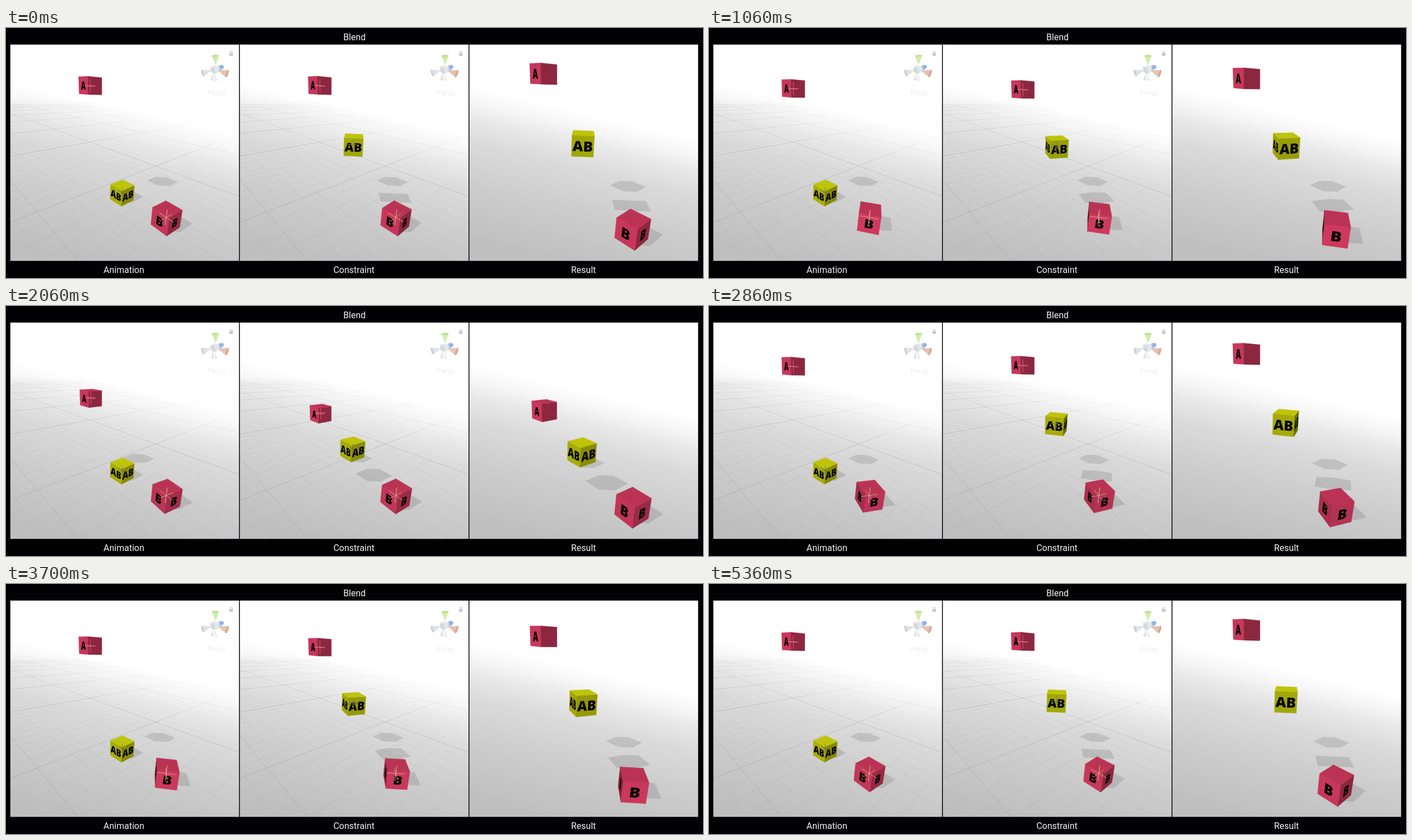
An HTML page with a canvas for the animation above (5400 ms loop, 1248 px wide and 449 px high).

```html
<!DOCTYPE html>
<html lang="en">
<head>
<meta charset="utf-8">
<title>Blend</title>
<style>
html, body { margin: 0; width: 100%; height: 100%; overflow: hidden; background: #020205; }
canvas { display: block; }
</style>
</head>
<body>
<canvas id="stage" width="1248" height="449"></canvas>
<script>
const stage = document.getElementById('stage');
const backdrop = document.createElement('canvas');
backdrop.width = stage.width;
backdrop.height = stage.height;
let g = backdrop.getContext('2d');

const TOP = 29.5, W = 410, H = 389, MID_Y = 224.5;
const FRAME = 100 / 3, FRAMES = 162;
const BOUNCE = 161 * FRAME / 4;      // one fall and rise of cube A, ms
const RAD = Math.PI / 180;
const SP = Math.sin(18 * RAD), CP = Math.cos(18 * RAD);     // camera pitch
const SR = Math.sin(2.4 * RAD), CR = Math.cos(2.4 * RAD);   // camera roll
const SIZE = 0.9, GROUND = -5.4;
const LIGHT = 0.81;                  // shadow shift to the right per unit of height

// focal: zoom of the view, lead: how far its clock runs ahead in ms
const panels = [
  { x: 7.5, focal: 336, lead: 40, editor: true, blended: false },
  { x: 418.5, focal: 336, lead: 0, editor: true, blended: true },
  { x: 829.5, focal: 394, lead: 0, editor: false, blended: true }
];

// Tint and how its brightness follows the face normal: base, x, y, z
const PINK = { rgb: [207, 57, 94], light: [0.47, -0.2, 0.43, -0.5] };
const YELLOW = { rgb: [190, 196, 10], light: [0.65, -0.13, 0.35, -0.2] };

// Time in ms and distance cube A has fallen
const fall = [[0, 0], [180, .09], [300, .29], [390, .64], [510, 1.98], [550, 2.31], [650, 3.28],
  [720, 2.89], [760, 1.95], [920, .62], [1020, .28], [1060, .21], [1200, .06], [BOUNCE, 0]];

function drop(t) {
  t %= BOUNCE;
  const i = fall.findIndex(k => k[0] > t) - 1;
  const slope = j => {
    const a = fall[j - 1], b = fall[j + 1];
    return a && b ? (b[1] - a[1]) / (b[0] - a[0]) : 0;
  };
  const [t0, y0] = fall[i], [t1, y1] = fall[i + 1];
  const d = t1 - t0, u = (t - t0) / d, u2 = u * u, u3 = u2 * u;
  return y0 * (2 * u3 - 3 * u2 + 1) + y1 * (3 * u2 - 2 * u3)
    + d * (slope(i) * (u3 - 2 * u2 + u) + slope(i + 1) * (u3 - u2));
}

const add = (p, q, k) => [p[0] + q[0] * k, p[1] + q[1] * k, p[2] + q[2] * k];
const dot = (p, q) => p[0] * q[0] + p[1] * q[1] + p[2] * q[2];

// Camera at the origin, pitched down and slightly rolled
function project(view, [x, y, z]) {
  const k = view.focal / (z * CP - y * SP);
  const sx = x * k, sy = -(y * CP + z * SP) * k;
  return [view.x + W / 2 + sx * CR - sy * SR, MID_Y + sx * SR + sy * CR];
}

function turn([x, y, z], yaw) {
  const c = Math.cos(yaw), s = Math.sin(yaw);
  return [x * c - z * s, y, x * s + z * c];
}

function poly(points, color) {
  g.beginPath();
  points.forEach(p => g.lineTo(p[0], p[1]));
  g.closePath();
  g.fillStyle = color;
  g.fill();
}

function hull(points) {
  points.sort((a, b) => a[0] - b[0] || a[1] - b[1]);
  const half = list => {
    const out = [];
    for (const p of list) {
      while (out.length > 1) {
        const [a, b] = out.slice(-2);
        if ((b[0] - a[0]) * (p[1] - a[1]) - (b[1] - a[1]) * (p[0] - a[0]) > 0) break;
        out.pop();
      }
      out.push(p);
    }
    return out.slice(0, -1);
  };
  return half(points).concat(half(points.slice().reverse()));
}

function drawShadow(view, cube) {
  const points = [];
  for (let i = 0; i < 8; i++) {
    const corner = [i & 1, i >> 1 & 1, i >> 2].map(v => (v - 0.5) * SIZE);
    const p = add(cube.pos, turn(corner, cube.yaw), 1);
    points.push(project(view, [p[0] + LIGHT * Math.max(0, p[1] - GROUND), GROUND, p[2]]));
  }
  poly(hull(points), 'rgba(0,0,0,.115)');
}

// Normal, right and up of each face; the first four carry letters
const faces = [0, 1, 2, 3].map(i => {
  const c = Math.round(Math.cos(i * Math.PI / 2)), s = Math.round(Math.sin(i * Math.PI / 2));
  return [[s, 0, -c], [c, 0, s], [0, 1, 0]];
}).concat([[[0, 1, 0], [1, 0, 0], [0, 0, 1]], [[0, -1, 0], [1, 0, 0], [0, 0, -1]]]);

function drawCube(view, cube) {
  const h = SIZE / 2;
  faces.forEach((face, i) => {
    const [n, u, v] = face.map(a => turn(a, cube.yaw));
    const center = add(cube.pos, n, h);
    if (dot(n, center) >= 0) return;
    const at = (a, b) => project(view, add(add(center, u, a * h), v, b * h));
    const light = cube.tint.light;
    const shade = Math.min(1.03, Math.max(0.5, light[0] + dot(n, light.slice(1))));
    const color = `rgb(${cube.tint.rgb.map(c => Math.round(c * shade))})`;
    poly([at(-1, -1), at(1, -1), at(1, 1), at(-1, 1)], color);
    g.strokeStyle = color;
    g.lineWidth = 0.5;
    g.stroke();
    if (i >= cube.letters) return;
    const o = at(0, 0), l = at(-1, 0), r = at(1, 0), t = at(0, 1), b = at(0, -1);
    g.save();
    g.transform((r[0] - l[0]) / 100, (r[1] - l[1]) / 100, (b[0] - t[0]) / 100, (b[1] - t[1]) / 100, o[0], o[1]);
    g.font = '800 66px "Open Sans", "Noto Sans", sans-serif';
    g.textAlign = 'center';
    g.textBaseline = 'alphabetic';
    g.fillStyle = '#080604';
    g.fillText(cube.text, 0, 24);
    g.restore();
  });
  if (view.editor) drawAxes(view, cube);
}

function drawAxes(view, cube) {
  g.lineWidth = 0.9;
  [[1, 0, 0], [0, 1, 0], [0, 0, 1]].forEach((axis, i) => {
    const a = turn(axis, cube.yaw);
    g.strokeStyle = cube.axes[i];
    g.beginPath();
    g.moveTo(...project(view, add(cube.pos, a, -cube.reach)));
    g.lineTo(...project(view, add(cube.pos, a, cube.reach)));
    g.stroke();
  });
}

function drawPanel(view, time) {
  const t = time + view.lead;
  const spin = t / BOUNCE * Math.PI;
  const fallen = drop(t);

  const a = {
    pos: [-2.06, 0.26 - fallen, 11.03], yaw: -45 * RAD,
    tint: PINK, text: 'A', letters: 1, axes: ['#e88391', '#dd5f78', '#e88391'], reach: 0.36
  };
  const b = {
    pos: [1.95, -5.19, 7.01], yaw: 45 * RAD - spin,
    tint: PINK, text: 'B', letters: 4, axes: ['#dfa184', '#d4cf88', '#d8b288'], reach: 0.4
  };
  const ab = {
    pos: [-0.05, view.blended ? -2.5 - fallen / 2 : -5.19, 9.02],
    yaw: view.blended ? -spin / 2 : 45 * RAD,
    tint: YELLOW, text: 'AB', letters: 4, axes: ['#8d8a30', '#777a68', '#55597a'], reach: 0.27
  };

  g.save();
  g.beginPath();
  g.rect(view.x, TOP, W, H);
  g.clip();
  const cubes = [a, ab, b];
  cubes.forEach(c => drawShadow(view, c));
  cubes.forEach(c => drawCube(view, c));
  g.restore();
}

function drawGrid(view) {
  const cx = view.x + W / 2;
  const fade = (from, to, alpha) => {
    const s = g.createLinearGradient(cx, from, cx - (to - from) * 0.2, to);
    s.addColorStop(0, 'rgba(90,90,90,0)');
    s.addColorStop(1, `rgba(90,90,90,${alpha})`);
    return s;
  };
  const minor = fade(145, 310, 0.1), major = fade(140, 220, 0.25);
  g.lineWidth = 0.8;
  for (const [side, start] of [[1, 16.1], [-1, 23.9]]) {
    for (let i = -25; i <= 60; i++) {
      const c = start + i * 1.27;
      g.strokeStyle = i % 10 ? minor : major;
      g.beginPath();
      for (const z of [1, 90]) g.lineTo(...project(view, [side * (c - z), GROUND, z]));
      g.stroke();
    }
  }
}

function ellipse(x, y, rx, ry, angle, color) {
  g.beginPath();
  g.ellipse(x, y, rx, ry, angle, 0, 7);
  g.fillStyle = color;
  g.fill();
}

// Cone from its tip to the middle of its round end
function cone(tx, ty, ex, ey, r, color, end) {
  const angle = Math.atan2(ey - ty, ex - tx);
  const dx = -Math.sin(angle) * r, dy = Math.cos(angle) * r;
  poly([[tx, ty], [ex + dx, ey + dy], [ex - dx, ey - dy]], color);
  ellipse(ex, ey, r * 0.3, r, angle, end);
}

function drawGizmo(x) {
  g.save();
  g.translate(x - 7.5, 0);
  cone(372, 80, 369, 93, 2.8, '#e3e6e8', '#d6dadd');
  cone(374, 80, 376, 94, 2.5, '#eceeef', '#e2e5e7');
  cone(368, 76, 352, 81, 6.5, '#e0e3e5', '#cdd1d4');
  cone(379, 76, 396, 82, 7, '#e5c2b3', '#d5a998');
  ellipse(384, 71, 6, 4.5, -0.4, '#b2c8ea');
  ellipse(386, 70, 4, 3.3, -0.4, '#95b3e0');
  poly([[366, 70], [373, 67], [382, 70], [381, 79], [374, 83], [367, 79]], '#e3e7ea');
  poly([[366, 70], [374, 73], [374, 83], [367, 79]], '#d3d9dc');
  cone(375.5, 67, 375, 50, 6.5, '#d3ecb0', '#c0e48c');
  g.fillStyle = '#c8c8c8';
  g.fillRect(400, 45, 6.5, 5);
  g.strokeStyle = '#c8c8c8';
  g.lineWidth = 1.2;
  g.beginPath();
  g.arc(403.2, 44.5, 2.2, Math.PI, 0);
  g.stroke();
  label('Persp', 376.5, 116.5, '#eeeeee', 12.5);
  g.restore();
}

function label(text, x, y, color = '#f2f2f2', size = 16) {
  g.font = `${size}px Roboto, Arial, sans-serif`;
  g.textAlign = 'center';
  g.textBaseline = 'middle';
  g.fillStyle = color;
  g.fillText(text, x, y + 1);
}

function drawBackdrop() {
  g.fillStyle = '#020205';
  g.fillRect(0, 0, 1248, 449);
  for (const view of panels) {
    g.save();
    g.beginPath();
    g.rect(view.x, TOP, W, H);
    g.clip();
    const cx = view.x + W / 2, y = view.editor ? 146 : 152;
    const floor = g.createLinearGradient(cx, y, cx - (418 - y) * 0.24, 418);
    [[0, 255], [0.1, 246], [0.2, 233], [0.35, 219], [0.65, 204], [1, 191]].forEach(([at, v]) =>
      floor.addColorStop(at, `rgb(${v},${v},${v})`));
    g.fillStyle = floor;
    g.fillRect(view.x, TOP, W, H);
    if (view.editor) {
      drawGrid(view);
      drawGizmo(view.x);
    }
    g.restore();
  }
  label('Blend', 624, 16);
  label('Animation', 211, 434);
  label('Constraint', 623, 434);
  label('Result', 1034, 434);
}

drawBackdrop();
g = stage.getContext('2d');

function tick(now) {
  const frame = Math.floor((now % 5400 + 7) / FRAME) % FRAMES;
  g.drawImage(backdrop, 0, 0);
  panels.forEach(view => drawPanel(view, frame * FRAME));
  requestAnimationFrame(tick);
}
requestAnimationFrame(tick);
</script>
</body>
</html>
```
